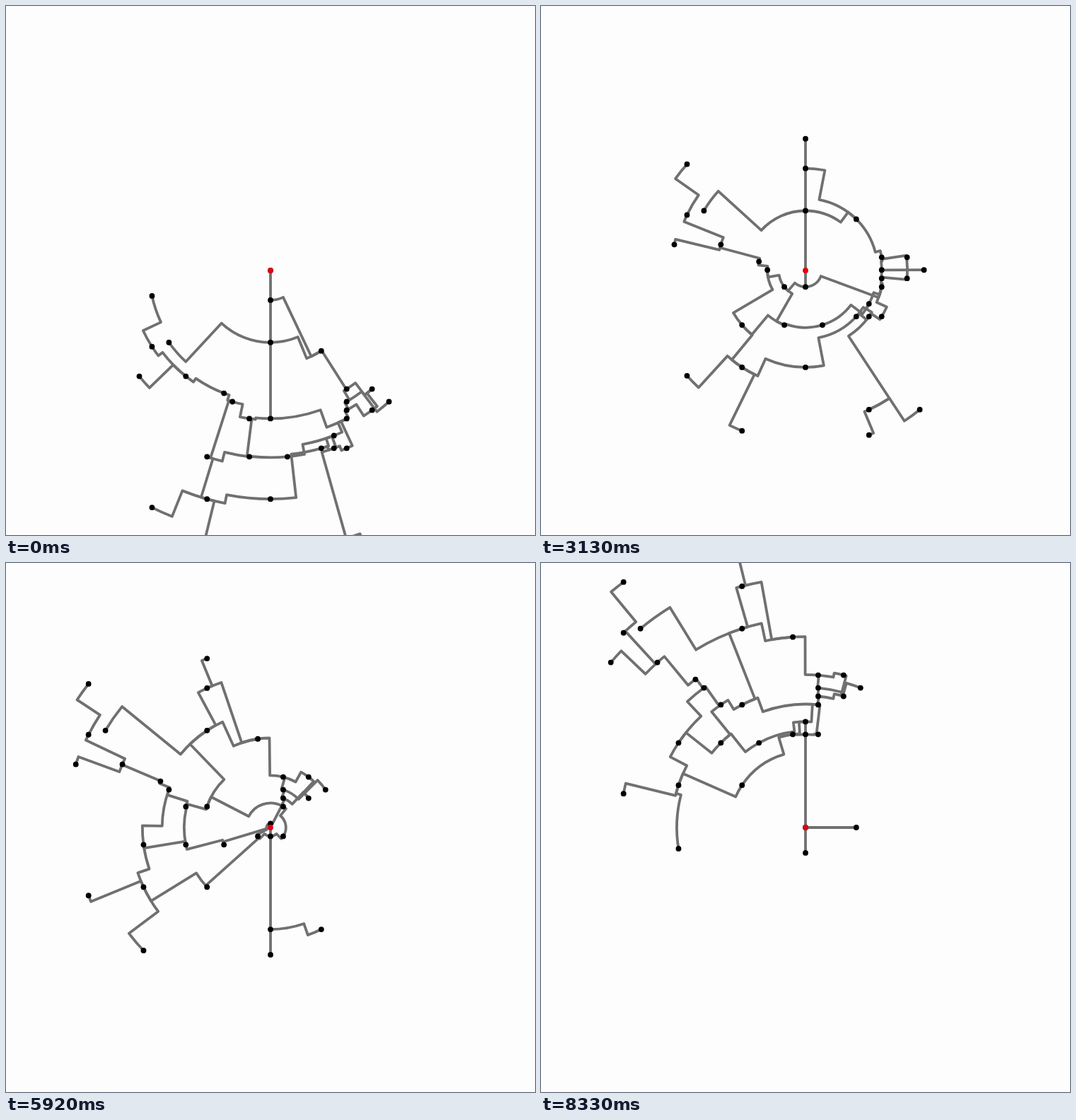
An HTML page with a canvas that plays this animation: 748x748 px, repeating every 8370 ms.

```html
<!DOCTYPE html>
<html lang="en">
<head>
<meta charset="utf-8">
<title>Orthoradial network</title>
<style>
  html, body { margin: 0; width: 100%; height: 100%; overflow: hidden; background: #fdfdfd; }
  canvas { display: block; width: 748px; height: 748px; }
</style>
</head>
<body>
<canvas id="stage" width="748" height="748"></canvas>
<script>
const ctx = document.getElementById('stage').getContext('2d');
const SIZE = 748, MID = SIZE / 2, UNIT = SIZE / 125;
const LOOP = 8370, FPS = 24, FRAMES = 200;

// Node positions in grid units
const nodes = {
  A: [0, 7 - 7], B: [0, 7], C: [0, 17], D: [0, 35], E: [-5, 35], F: [-9, 31],
  G: [-11, 29], H: [-20, 25], I: [-31, 25], J: [-28, 18], K: [-28, 6], L: [-24, 17],
  M: [12, 19], N: [18, 28], O: [18, 31], P: [18, 33], Q: [18, 35], R: [24, 28],
  S: [24, 33], T: [28, 31], U: [15, 39], V: [12, 42], W: [15, 42], X: [18, 42],
  Y: [4, 44], Z: [-5, 44], a: [-15, 44], b: [-15, 54], c: [0, 54], d: [-28, 56],
  e: [-15, 69], f: [15, 64], g: [15, 70], h: [27, 64]
};
const edges = ('AB BC CD BM CM CL MN KJ JH IH HG GF FE ED DQ QP PO ON NR RS PS OT ' +
  'QU QX UV UW VW WX UY YZ Za ZE Fa ab bc bd be cV Wf fg fh').split(' ');
const route = [...'ADQUWf'].map(k => nodes[k]);

const legs = route.slice(1).map((p, i) => Math.hypot(p[0] - route[i][0], p[1] - route[i][1]));
const total = legs.reduce((s, l) => s + l, 0);

function focusAt(dist) {
  let i = 0;
  while (i < legs.length - 1 && dist > legs[i]) dist -= legs[i++];
  const t = Math.min(1, dist / legs[i]), [x, y] = route[i], [u, v] = route[i + 1];
  return [x + (u - x) * t, y + (v - y) * t];
}

function arcTo(r, from, to) {
  const turn = Math.atan2(Math.sin(to - from), Math.cos(to - from));
  ctx.arc(0, 0, r, from, from + turn, turn < 0);
}

// Arc, radial step, arc; the middle of the step lies on the straight chord
function drawEdge(p, q) {
  const [x, y] = p, dx = q[0] - x, dy = q[1] - y;
  ctx.beginPath();
  if (Math.abs(x * dy - y * dx) < 1e-6) {
    ctx.moveTo(x, y);
    ctx.lineTo(q[0], q[1]);
  } else {
    const r1 = Math.hypot(x, y), r2 = Math.hypot(q[0], q[1]), mean = (r1 + r2) / 2;
    const a = dx * dx + dy * dy, b = x * dx + y * dy, c = r1 * r1 - mean * mean;
    const root = Math.sqrt(Math.max(0, b * b - a * c));
    const t = (r2 > r1 ? root - b : -root - b) / a;
    const bend = Math.atan2(y + dy * t, x + dx * t);
    arcTo(r1, Math.atan2(y, x), bend);
    arcTo(r2, bend, Math.atan2(q[1], q[0]));
  }
  ctx.stroke();
}

function dot(x, y, color) {
  ctx.fillStyle = color;
  ctx.beginPath();
  ctx.arc(x, y, 3.9, 0, Math.PI * 2);
  ctx.fill();
}

function render(ms) {
  const step = Math.min(FRAMES, Math.floor((ms % LOOP + 4.9) * FPS / 1000));
  const [fx, fy] = focusAt(total * step / FRAMES);
  const at = {};
  for (const k in nodes) at[k] = [(nodes[k][0] - fx) * UNIT, (nodes[k][1] - fy) * UNIT];

  ctx.setTransform(1, 0, 0, 1, 0, 0);
  ctx.fillStyle = '#fdfdfd';
  ctx.fillRect(0, 0, SIZE, SIZE);
  ctx.translate(MID, MID);
  ctx.strokeStyle = '#707070';
  ctx.lineWidth = 3.8;
  ctx.lineJoin = 'round';
  for (const [p, q] of edges) drawEdge(at[p], at[q]);
  for (const k in at) dot(at[k][0], at[k][1], '#000');
  dot(0, 0, '#e2000f');
}

const start = performance.now();
function tick() {
  render(performance.now() - start);
  requestAnimationFrame(tick);
}
tick();
</script>
</body>
</html>
```
